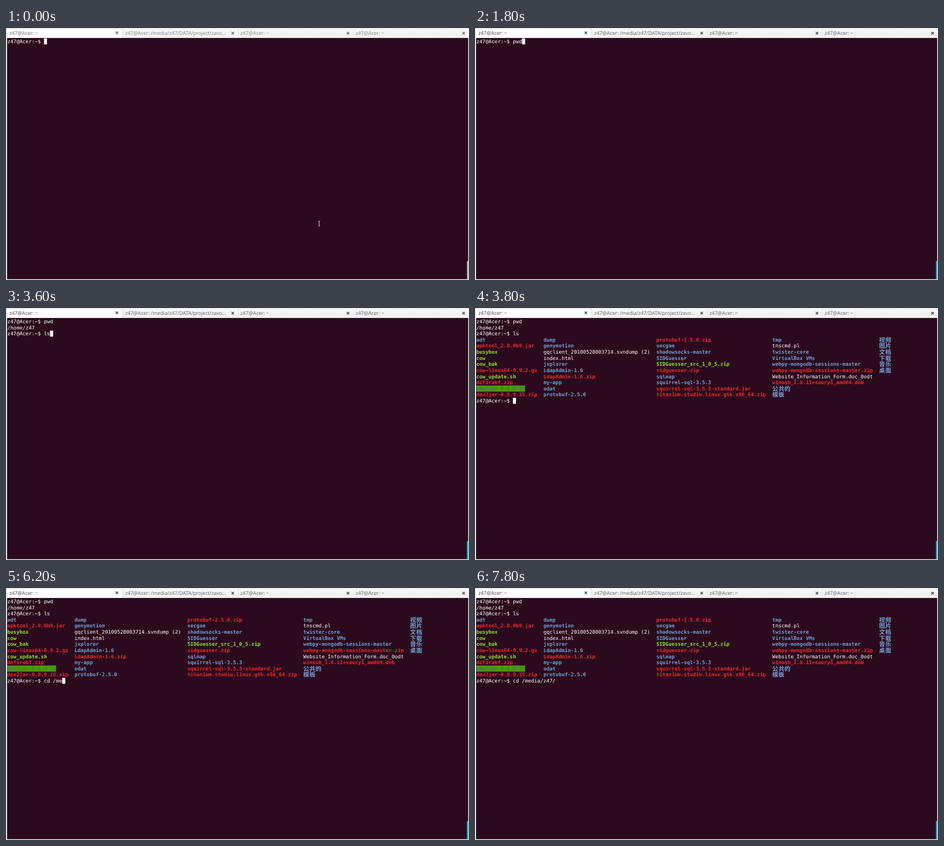
Write an HTML page that moves like this. It is 882 px wide and 480 px high and loops after 8000 ms.

```html
<!DOCTYPE html>
<html lang="en">
<head>
<meta charset="utf-8">
<title>Terminal</title>
<style>
html, body { margin: 0; width: 100%; height: 100%; overflow: hidden; background: #f3f2f1; }
svg { display: block; }
text { white-space: pre; text-rendering: geometricPrecision; }
.term { font: 9.656px "DejaVu Sans Mono", monospace; fill: #fff; }
.cjk { font: bold 11.4px "Noto Sans CJK SC", "Noto Sans CJK", sans-serif; letter-spacing: .22px; }
.tab { font: 9.6px "Open Sans", "Noto Sans", sans-serif; }
</style>
</head>
<body>
<svg id="stage" width="882" height="480" viewBox="0 0 882 480">
  <defs>
    <linearGradient id="bar" x2="0" y2="1">
      <stop offset="0" stop-color="#f8f8f7"/><stop offset="1" stop-color="#f1f0ef"/>
    </linearGradient>
  </defs>
  <rect width="882" height="480" fill="#f0eff0"/>
  <rect width="882" height="19" fill="url(#bar)"/>
  <path d="M0 .5H882" stroke="#dededd"/>
  <path d="M442.5 2V17M661.5 2V17" stroke="#e4e3e2"/>
  <path d="M.5 19V3.5Q.5 .5 3.5 .5H219Q222.500 .5 222.500 4V19" fill="#fdfdfd" stroke="#cfcecd"/>
  <rect x="2" y="19" width="878.500" height="459.500" fill="#2c0a1e"/>
  <g id="tabs"></g>
  <g id="screen" class="term"></g>
  <rect id="cursor" width="5.800" height="11.400" fill="#fff"/>
  <path id="pointer" d="M-1.700 -4.500H-.5L0 -4L.5 -4.500H1.700M0 -4V4M-1.700 4.500H-.5L0 4L.5 4.500H1.700" fill="none" stroke="#e9e4e7"/>
  <rect id="thumb" x="878" y="444" width="2.500" height="34.500"/>
</svg>
<script>
const LOOP = 8000, CELL = 5.813, ROW = 11.63, LEFT = 2.5, TOP = 19.7;
const USER = "z47", HOST = USER + "@Acer:", PROMPT = HOST + "~$ ";
const COLORS = { b: "#729fcf", r: "#ef2929", g: "#8ae234", w: "#ffffff", o: "#3465a4" };
const $ = id => document.getElementById(id);
const colX = c => LEFT + c * CELL;
const rowY = r => TOP + r * ROW;

function add(parent, tag, attrs, text = "") {
  const el = document.createElementNS("http://www.w3.org/2000/svg", tag);
  for (const k in attrs) el.setAttribute(k, attrs[k]);
  el.textContent = text;
  parent.appendChild(el);
  return el;
}

function print(parent, col, row, text, attrs = {}) {
  return add(parent, "text", { x: colX(col), y: rowY(row) + 9.2, ...attrs }, text);
}

// Tabs: left edge, close button, title
const tabs = [
  [6.5, 211.2, "~"],
  [227, 432, `/media/${USER}/DATA/project/zavo…`],
  [446.5, 651.5, "~"],
  [666, 871.7, "~"]
].map(([x, close, path], i) => {
  const y = i ? 9.8 : 9.2;
  return {
    title: add($("tabs"), "text", { x, y: y + 3.3, class: "tab" }, HOST + " " + path),
    cross: add($("tabs"), "path", {
      d: `M${close - 2.3} ${y - 2.3}l4.6 4.6m0 -4.6l-4.600 4.600`, "stroke-width": 1.5
    })
  };
});

// Directory listing: start column, then entries with a colour letter in front
const LISTING = [
  [0, "b adt|r apktool_2.0.0b9.jar|g busybox|g cow|g cow_bak|r cow-linux64-0.9.2.gz|g cow_update.sh|r deforabf.zip|o dex2jar-0.0.9.15|r dex2jar-0.0.9.15.zip"],
  [22, "b dump|b genymotion|w gqclient_20100528003714.svndump (2)|w index.html|b jxplorer|b LdapAdmin-1.6|r LdapAdmin-1.6.zip|b my-app|b odat|b protobuf-2.5.0"],
  [59, "r protobuf-2.5.0.zip|b secgae|b shadowsocks-master|b SIDGuesser|g SIDGuesser_src_1_0_5.zip|r sidguesser.zip|b sqlmap|b squirrel-sql-3.5.3|r squirrel-sql-3.5.3-standard.jar|r titanium.studio.linux.gtk.x86_64.zip"],
  [97, "b tmp|w tnscmd.pl|b twister-core|b VirtualBox VMs|b webpy-mongodb-sessions-master|r webpy-mongodb-sessions-master.zip|w Website_Information_Form.doc_0odt|r winusb_1.0.11+saucy1_amd64.deb|b 公共的|b 模板"],
  [132, "b 视频|b 图片|b 文档|b 下载|b 音乐|b 桌面"]
];

const screen = $("screen");
const lines = [0, 2, 13].map(r => print(screen, 0, r, PROMPT));
const home = print(screen, 0, 1, "/home/" + USER);
const listing = add(screen, "g", {});
for (const [col, items] of LISTING) {
  items.split("|").forEach((item, i) => {
    const kind = item[0], name = item.slice(2), row = i + 3;
    if (kind === "o") {
      add(listing, "rect", {
        x: colX(col), y: rowY(row), width: name.length * CELL, height: ROW, fill: "#4e9a06"
      });
    }
    const style = `fill:${COLORS[kind]};font-weight:${"wo".includes(kind) ? 400 : 700}`;
    const el = print(listing, col, row, name, { style });
    if (name.charCodeAt(0) > 255) {
      el.setAttribute("class", "cjk");
      el.setAttribute("y", rowY(row) + 10.1);
    }
  });
}

// Start time, active prompt, typed text, cursor shown
const TYPING = [
  [0, 0, "", 1], [1800, 0, "pwd", 1],
  [2000, 1, "", 1], [2600, 1, "", 0], [3200, 1, "", 1], [3400, 1, "l", 1], [3600, 1, "ls", 1],
  [3800, 2, "", 1], [4400, 2, "", 0], [5000, 2, "", 1],
  [5600, 2, "cd ", 1], [6000, 2, "cd /", 1], [6200, 2, "cd /me", 1], [6600, 2, "cd /media/", 1],
  [7200, 2, `cd /media/${USER}/`, 1], [7800, 2, `cd /media/${USER}/`, 0]
];
const POINTER = [[0, 596.5, 372.5], [200, 584.5, 363], [400, 526.5, 239.5], [600, 523.5, 235.8]];
const COMMANDS = ["pwd", "ls"];

const at = (list, t) => list.filter(s => s[0] <= t).pop();
const show = (el, on) => el.setAttribute("visibility", on ? "visible" : "hidden");

function draw(t) {
  const [, active, typed, lit] = at(TYPING, t);
  lines.forEach((line, i) => {
    line.textContent = PROMPT + (i < active ? COMMANDS[i] : i === active ? typed : "");
    show(line, i <= active);
  });
  show(home, active > 0);
  show(listing, active > 1);

  const cursor = $("cursor");
  cursor.setAttribute("x", colX(PROMPT.length + typed.length));
  cursor.setAttribute("y", rowY([0, 2, 13][active]) + 0.1);
  show(cursor, lit);

  const [, px, py] = at(POINTER, t);
  $("pointer").setAttribute("transform", `translate(${px} ${py})`);
  show($("pointer"), t < 1800);

  const focused = t >= 800;
  tabs.forEach(({ title, cross }, i) => {
    const color = focused ? (i ? "#626262" : "#474747") : (i ? "#858585" : "#6c6c6c");
    title.setAttribute("fill", color);
    cross.setAttribute("stroke", focused ? "#484848" : "#686868");
  });
  $("thumb").setAttribute("fill", focused ? "#19b5dc" : "#b9b6b8");
}

const start = performance.now();
function tick() {
  draw((performance.now() - start) % LOOP);
  requestAnimationFrame(tick);
}
tick();
</script>
</body>
</html>
```
